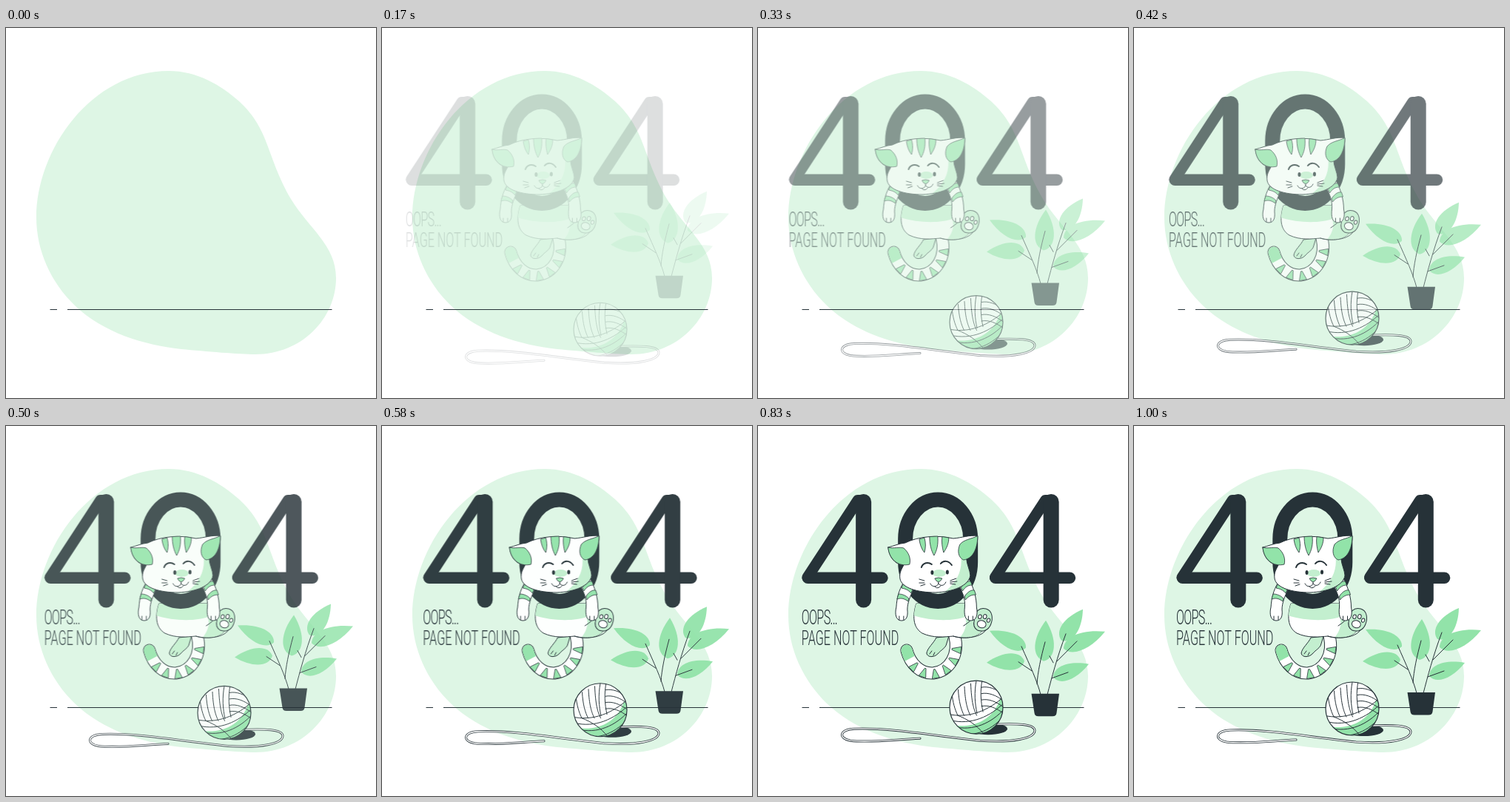
Animation, 500 px wide and 500 px high, one loop 1.04 s. Source, as an HTML page:

```html
<!DOCTYPE html>
<html lang="en">
<head>
<meta charset="utf-8">
<title>Page not found</title>
<style>
  html, body { margin: 0; width: 100%; height: 100%; overflow: hidden; background: #fff; }
  svg { display: block; width: 100vw; height: 100vh; }
  .ink { fill: none; stroke: #263238; stroke-width: 1; stroke-linecap: round; stroke-linejoin: round; }
  .skin { fill: #fff; stroke: #263238; stroke-width: 1; stroke-linejoin: round; }
  .mint { fill: #92e3a9; stroke: #263238; stroke-width: .8; stroke-linejoin: round; }
  .shade { fill: #c3efcf; }
  .dark { fill: #263238; }
  .digit { fill: none; stroke: #263238; stroke-linecap: round; stroke-linejoin: round; }
  text { font: 300 28px Roboto, "Liberation Sans", sans-serif; fill: #263238; }
</style>
</head>
<body>
<svg viewBox="0 0 500 500">
  <defs>
    <g id="four" class="digit">
      <path d="M141 100.500H133L65 204.500" stroke-width="15"/>
      <path d="M65.500 205.300H166" stroke-width="15.600"/>
      <path d="M140.800 102.500V235" stroke-width="21"/>
    </g>
    <clipPath id="ball"><circle cx="295" cy="382" r="36"/></clipPath>
    <clipPath id="torso"><path id="torsoShape" d="M212 240C207 256 207 272 220 280C235 287 250 285 262 284C274 288 291 287 300 278L296 250L280 240Z"/></clipPath>
    <path id="tail" d="M199 303C204 322 218 335 235 334C258 331 270 308 264 284"/>
    <path id="thread" d="M219 424C180 426 150 430 125 427C108 424 110 412 130 411C180 409 240 421 300 427C345 430 374 424 374 413C373 404 350 404 318 405"/>
    <clipPath id="headClip"><path id="head" d="M174 164C182 162 188 159 197 158C215 149 240 147 262 152C274 151 284 147 295 148.500C295 160 291 176 280 180C280 186 285 196 285 202C283 216 262 224 238 225C214 225 192 219 190 206C189 198 192 194 195 188C182 187 175 176 174 164Z"/></clipPath>
  </defs>

  <path fill="#def6e5" d="M41 256C41 165 115 58 220 58C258 58 290 77 315 99C357 138 351 172 385 231C409 271 446 293 446 338C446 392 400 441 337 441C315 441 270 437 237 434C185 428 132 412 93 375C60 343 41 300 41 256Z"/>
  <path class="ink" style="stroke-linecap:butt" d="M59.500 380.500H69M83 380.500H440.500"/>

  <g id="plant">
    <g id="leaves" fill="#92e3a9"></g>
    <path class="ink" d="M382 361C377 342 368 323 356 296M370 329L352 317M377 347C378 331 382 312 388 290
      M391 361C397 338 404 311 416 279M404 316L431 289M397 339L419 331M399 318L394 309"/>
    <path class="dark" d="M369.500 360H407L403.500 386Q403 390.500 398 390.500H379Q374 390.500 373.500 386Z"/>
  </g>

  <g id="yarn">
    <ellipse class="dark" cx="311" cy="411" rx="26" ry="8"/>
    <use href="#thread" class="ink" style="stroke-width:3"/>
    <use href="#thread" class="ink" style="stroke:#fff;stroke-width:1.300"/>
    <circle cx="295" cy="382" r="36" fill="#fff"/>
    <g clip-path="url(#ball)">
      <path fill="#92e3a9" d="M262 406C292 411 319 398 327 370L336 380V420H262Z"/>
      <g id="strands" class="ink"></g>
    </g>
    <circle class="ink" cx="295" cy="382" r="36" style="stroke-width:1.200"/>
  </g>

  <g id="cat">
    <use href="#four"/>
    <use href="#four" x="253.500"/>
    <!-- horizontal squeeze gives a condensed face -->
    <g transform="translate(57 0) scale(.578 1)">
      <text y="268" letter-spacing="-1.200">OOPS...</text>
      <text y="296">PAGE NOT FOUND</text>
    </g>

    <use href="#tail" class="ink" style="stroke-width:17"/>
    <use href="#tail" fill="none" stroke="#fff" stroke-width="15" stroke-linecap="round"/>
    <use href="#tail" fill="none" stroke="#92e3a9" stroke-width="15" stroke-dasharray="12 200"/>
    <circle cx="199" cy="303" r="7.500" fill="#92e3a9"/>
    <g id="wedges" class="mint"></g>
    <path class="skin shade" style="fill:#c3efcf" d="M239 286C236 293 227 300 226 307C227 313 236 313 241 308C246 302 252 300 253 294L256 284Z"/>
    <path class="ink" d="M230 308L233 304M235 310L237 306"/>

    <use href="#torsoShape" class="skin"/>
    <path class="shade" clip-path="url(#torso)" d="M205 240H305V290H268C276 281 282 270 278 258C262 264 230 264 205 255Z"/>
    <path class="ink" d="M262 284C275 288 298 287 306 276M276 270C282 266 287 262 292 256"/>
    <g transform="translate(302 262) rotate(16)">
      <path class="skin" style="fill:#c3efcf" d="M-11 3C-14 -8 -9 -15.500 0 -15.500C9 -15.500 13 -6 12 3C11 12 4 16 -3 15.500C-9 14 -11 8 -11 3Z"/>
      <ellipse class="skin" cx="0" cy="6" rx="6" ry="5"/>
      <g class="skin">
        <ellipse cx="-5" cy="-3" rx="2.200" ry="2.800"/>
        <ellipse cx="1.500" cy="-5" rx="2.300" ry="3"/>
        <ellipse cx="7.500" cy="-1.500" rx="2.100" ry="2.700"/>
      </g>
    </g>

    <rect class="digit" x="197.300" y="99.500" width="88" height="137.500" rx="44" ry="53" stroke-width="20"/>

    <g transform="translate(-2 -1)">
      <path class="skin" d="M197 212C190 224 188 233 187 246C185 254 186 264 194 264C201 264 203 258 202 249C202 240 206 231 210 222Z"/>
      <path class="mint" d="M196 215L209 222L207 227C203 222 199 221 194 220ZM190 228C195 228 200 230 204 234L203 238C198 234 193 233 188 235Z"/>
      <path class="ink" d="M191 263V258M197 263V258"/>
    </g>
    <g transform="translate(-.500 -1)">
      <path class="skin" d="M270 216C275 226 279 234 278 246C277 255 278 264 286 264C294 264 296 256 294 246C294 233 290 219 283 206Z"/>
      <path class="mint" d="M273 219C278 213 283 210 286 211L288 216C283 216 279 218 275 224ZM278 231C282 225 287 222 291 223L293 229C287 229 283 231 279 236Z"/>
      <path class="ink" d="M283 263V258M289 263V258"/>
    </g>

    <use href="#head" fill="#fff"/>
    <path class="shade" clip-path="url(#headClip)" d="M270 165C276 185 274 207 248 226H290V165Z"/>
    <ellipse class="shade" cx="243" cy="199" rx="9" ry="5"/>
    <use href="#head" class="ink"/>
    <path class="mint" d="M174 164C182 166 190 163 195 165C202 171 205 179 203 187C187 191 175 179 174 164ZM295 148.500C286 153 277 153 271 160C267 169 269 178 276 181C290 179 295 163 295 148.500Z"/>
    <path class="mint" d="M216 153L223 151C225 158 225 164 223 171C219 166 217 160 216 153ZM230 149.500L241 149C242 160 240 168 236 175C232 168 230 159 230 149.500ZM247 149.500L256 151C256 159 253 165 249 171C247 164 246 157 247 149.500Z"/>
    <g class="ink">
      <path style="stroke-width:2" d="M219 191C221 185 228 183 233 187M245 186C249 181 256 182 260 188"/>
      <path d="M242 210V213C240 218 233 218 231 213M242 213C245 217 250 216 252 211M237 217C239 220 243 219 245 216"/>
      <path d="M216 207L223 209M216 212L223 212M218 216L224 214M258 209L266 206M258 211L267 210M258 213L265 214"/>
    </g>
    <ellipse class="dark" cx="233.500" cy="198" rx="2" ry="3"/>
    <ellipse class="dark" cx="254" cy="197.500" rx="2" ry="3"/>
    <path class="mint" d="M237 206Q242 204 247 206Q245 210 242 211Q239 210 237 206Z"/>
  </g>
</svg>
<script>
const LOOP = 1040, FPS = 24, TRAVEL = 30;
const byId = id => document.getElementById(id);
const toPath = d => `<path d="${d}"/>`;

// A leaf is a base, a tip and the bulge of both sides.
function leaf([x1, y1, x2, y2, w]) {
  const dx = x2 - x1, dy = y2 - y1, len = Math.hypot(dx, dy);
  const side = (t, s) => `${x1 + dx * t - dy / len * w * s} ${y1 + dy * t + dx / len * w * s}`;
  return toPath(`M${x1} ${y1}C${side(.1, 1)} ${side(.55, 1)} ${x2} ${y2}C${side(.55, -1)} ${side(.1, -1)} ${x1} ${y1}Z`);
}
byId('leaves').innerHTML = [
  [410, 288, 439, 246, 15], [413, 299, 469, 276, 15], [399, 338, 447, 320, 14],
  [386, 316, 389, 261, 17], [362, 298, 313, 275, 14], [360, 316, 309, 318, 15]
].map(leaf).join('');

// Tail stripes narrow from the outer edge towards the inner one.
const tail = byId('tail');
function wedge(s) {
  const at = (t, off) => {
    const p = tail.getPointAtLength(t), q = tail.getPointAtLength(t + .1);
    const a = Math.atan2(q.y - p.y, q.x - p.x);
    return `${p.x - Math.sin(a) * off} ${p.y + Math.cos(a) * off}`;
  };
  return toPath(`M${at(s - 4, 7.5)}L${at(s - 1, -5)}L${at(s + 1, -5)}L${at(s + 4, 7.5)}Z`);
}
byId('wedges').innerHTML = [24, 39, 54, 69, 84, 99].map(wedge).join('');

// Wound strands: fan on the left, upright band, cross lines on the right, slanted wraps below.
const strands = ['M295 346C292 362 293 377 296 390', 'M303 345C300 360 301 374 304 388'];
for (let i = 0; i < 4; i++) {
  const s = i * 8.5;
  strands.push(
    `M${262 + s} ${362 - i * 4}C${263 + s} 375 ${266 + s} 385 ${270 + s} 393`,
    `M302 ${355 + s}C311 ${353 + s} 322 ${357 + s} 332 ${365 + s}`,
    `M${256 + i * 4} ${391 + s}C${285 + i * 3} ${398 + s} ${312 + i * 2} ${386 + s} 333 ${367 + s}`
  );
}
strands.push('M270 393C283 398 296 406 305 418');
byId('strands').innerHTML = strands.map(toPath).join('');

const bezier = (a, b, s) => 3 * (1 - s) ** 2 * s * a + 3 * (1 - s) * s * s * b + s ** 3;
function ease(x) {
  let lo = 0, hi = 1;
  for (let i = 0; i < 24; i++) {
    const mid = (lo + hi) / 2;
    if (bezier(.36, .5, mid) < x) lo = mid; else hi = mid;
  }
  return bezier(-.01, 1.38, hi);
}

function slide(id, dx, dy, p) {
  const g = byId(id), rest = (1 - p) * TRAVEL;
  g.setAttribute('transform', `translate(${dx * rest} ${dy * rest})`);
  g.setAttribute('opacity', Math.min(1, Math.max(0, p)));
}

function draw(now) {
  const step = Math.floor(now % LOOP * FPS / 1000 + .15);
  const p = step < 2 ? 0 : ease(Math.min(1, (step + 1) / FPS));
  slide('cat', -1, 0, p);
  slide('plant', 0, -1, p);
  slide('yarn', 0, 1, p);
}

const start = performance.now();
function tick() {
  draw(performance.now() - start);
  requestAnimationFrame(tick);
}
tick();
</script>
</body>
</html>
```
